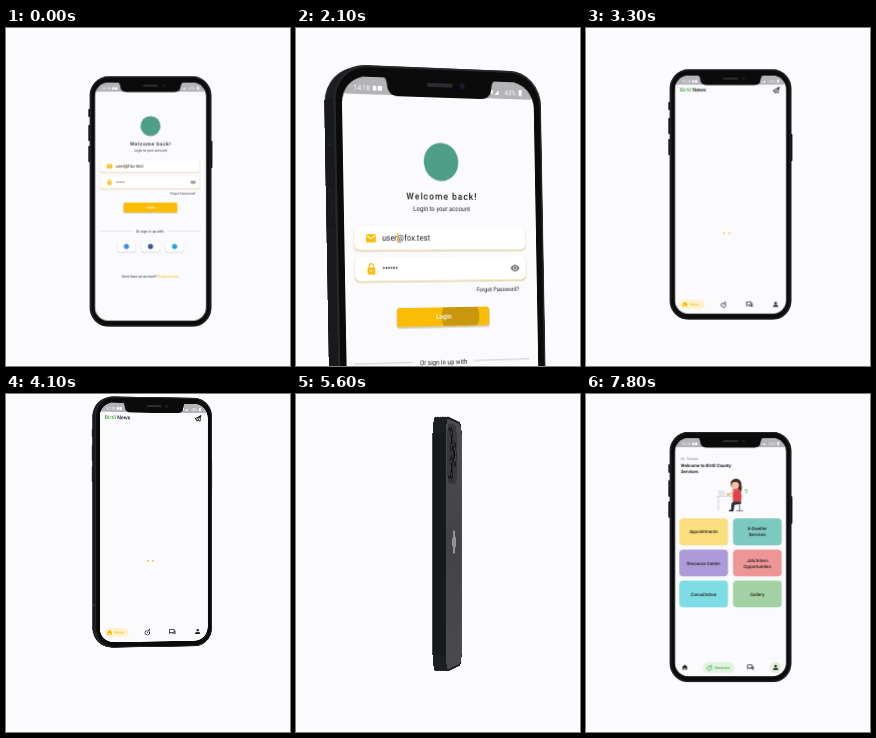
An HTML page that plays this animation: 284 by 338 pixels, repeating every 8000 ms.

```html
<!DOCTYPE html>
<html lang="en">
<head>
<meta charset="utf-8">
<title>Phone app showcase</title>
<style>
  html, body { margin: 0; width: 100%; height: 100%; overflow: hidden; background: #fcfbfe; }
  #stage { position: absolute; left: 0; top: 0; width: 284px; height: 338px; overflow: hidden; background: #fcfbfe; }
  #phone { position: absolute; left: -120px; top: -249px; width: 240px; height: 498px; transform-style: preserve-3d; }
  #phone > div { position: absolute; }
  .full { left: 0; top: 0; width: 240px; height: 498px; }
  .layer { border-radius: 37px; background: #1c1f21; }
  .layer i { position: absolute; width: 8px; background: #17191b; border-radius: 2px; }
  .side { width: 26px; height: 430px; top: 34px; backface-visibility: hidden; background: #17191a; }
  .side b { position: absolute; left: 11px; top: 378px; width: 4px; height: 4px; border-radius: 50%; background: #eee; }
  .side i { position: absolute; left: 8px; width: 8px; border: 1px solid #2b2d2f; border-radius: 4px; }
  .face { backface-visibility: hidden; }
  .back { box-sizing: border-box; border-radius: 37px; border: 4px solid #19191b;
          background: linear-gradient(#4c4c4f, #434346 50%, #4a4a4c); }
  .mark { position: absolute; left: 92px; top: 217px; width: 48px; height: 48px; border-radius: 50%; background: #929295; }
  .bump { position: absolute; left: 9px; top: 13px; width: 110px; height: 118px; border-radius: 29px; background: #38383b; }
  .bump u { position: absolute; box-sizing: border-box; width: 50px; height: 50px; border-radius: 50%;
            border: 6px solid #1a1a1c; background: radial-gradient(#0d0d10 35%, #55555a 40%, #242427 60%); }
  svg { position: absolute; left: 0; top: 0; font-family: Roboto, Inter, sans-serif; text-rendering: geometricPrecision; }
</style>
</head>
<body>
<div id="stage"><div id="phone"></div></div>
<script>
const LOOP = 8000, STEP = 100;
const GOLD = '#fbbc05', INK = '#222';

// time, centre x, centre y, scale, turn, roll
const POSES = [
  [0, 144.5, 173.5, 1, 0, 0],
  [450, 140.5, 198, 1.57, 2, -.1],
  [900, 137.3, 224, 2.05, 5, -.2],
  [1100, 138, 227, 2.055, 10, -.3],
  [1800, 139, 264, 2.03, 17, -.7],
  [2100, 142.3, 277.5, 1.895, 25, -1],
  [2700, 143, 212, 1.28, 14, -.5],
  [3100, 144.5, 171, 1.01, 1, 0],
  [3300, 144.5, 166.5, 1, 0, 0],
  [3600, 144.5, 134.5, 1, 0, 0],
  [4300, 148, 127.5, 1, 25, 0],
  [4800, 157, 127.5, 1, 100, 0],
  [5200, 159.2, 137, 1.02, 181, 0],
  [5600, 151.5, 150, 1, 262, 0],
  [6000, 145.5, 160.5, 1, 337, 0],
  [6300, 144.5, 163, 1, 360, 0]
];

// ---- drawing helpers -------------------------------------------------
const txt = (x, cy, size, str, more = '') =>
  `<text x="${x}" y="${cy + size * .35}" font-size="${size}" fill="${INK}" ${more}>${str}</text>`;
const mid = 'text-anchor="middle" ';
const box = (x, y, w, h, r, fill, more = '') =>
  `<rect x="${x}" y="${y}" width="${w}" height="${h}" rx="${r}" fill="${fill}" ${more}/>`;
const dot = (x, y, r, fill, more = '') => `<circle cx="${x}" cy="${y}" r="${r}" fill="${fill}" ${more}/>`;
const path = (d, fill, more = '') => `<path d="${d}" fill="${fill}" ${more}/>`;
const at = (x, y, body) => `<g transform="translate(${x} ${y})">${body}</g>`;
const raised = (x, y, w, h, r, tint) =>
  box(x - .6, y + .4, w + 1.2, h + 1.6, r, tint) + box(x, y, w, h, r, '#fff');

const home = c => path('M0-5.5L6 0H4.2V5H1.3V1.6H-1.3V5H-4.2V0H-6Z', c);
const person = c => dot(0, -2.6, 2.5, c) + path('M-5 5V3.5C-5 0 5 0 5 3.5V5Z', c);
const chat = c => path('M-6-5H3V1H-3.5L-6 3.2Z', 'none', `stroke="${c}" stroke-width="1.5"`) +
  path('M4.2-2.5H6V5.6L3.6 3.6H-2V2.2H4.2Z', c);
const leaf = c => path('M-2.5 4.5A3.6 3.6 0 0 1-2-2.4H1L4-5 3.4-1.4A4 4 0 0 1-2.5 4.5Z', 'none',
  `stroke="${c}" stroke-width="1.5"`) + dot(.6, .6, 1, c);
const plane = c => path('M-6.5 1L6-6 4 5.5-.2 3.4-2.6 6-2.8 2.4Z', 'none',
  `stroke="${c}" stroke-width="1.5" stroke-linejoin="round"`) + path('M-2.8 2.4L6-6-.2 3.4', 'none', `stroke="${c}" stroke-width="1.2"`);

// ---- screens ---------------------------------------------------------
function login() {
  const social = ['#4285f4', '#3b5998', '#1da1e8'].map((c, i) => {
    const x = 53 + i * 48;
    return raised(x, 327.5, 38, 22, 7, '#dcdce4') + dot(x + 19, 338.5, 5.2, c);
  }).join('');
  return dot(120, 98.5, 20, '#4f9f86') +
    txt(120.5, 135, 9.8, 'Welcome back!', mid + 'font-weight="500" letter-spacing="1.2"') +
    txt(120, 147.5, 6.85, 'Login to your account', mid) +
    raised(20, 166.5, 198, 24, 6, '#e8dcb8') + raised(20, 198.5, 198, 24, 6, '#e8dcb8') +
    at(38.5, 178.5, box(-5.5, -4.3, 11, 8.6, 1.2, GOLD) + path('M-4.6-2.8L0 .4 4.6-2.8', 'none', 'stroke="#fff" stroke-width="1.1"')) +
    at(38.5, 210.5, box(-4.3, -2, 8.6, 7.4, 1.1, GOLD) + dot(0, 1.7, 1.1, '#fff') +
      path('M-2.4-2V-3.4A2.4 2.4 0 0 1 2.4-3.4V-2', 'none', `stroke="${GOLD}" stroke-width="1.3"`)) +
    txt(51, 177.5, 8.8, 'user@fox.test') + box(68.2, 172.5, 1, 11, 0, GOLD) +
    txt(51, 209.5, 8, '••••••', 'font-weight="700"') +
    at(205, 210.5, path('M-5.5 0Q0-7.5 5.5 0Q0 7.5-5.5 0Z', '#777') + dot(0, 0, 2.3, '#fff') + dot(0, 0, 1.4, '#777')) +
    txt(209.5, 233, 6.3, 'Forgot Password?', 'text-anchor="end"') +
    box(65.8, 252, 108, 20.5, 3, '#d6cdb8') + box(66.5, 251, 106.5, 19.5, 2.5, GOLD) +
    `<g clip-path="url(#btn)">${dot(139.5, 260.5, 0, '#c9980f', 'id="ripple"')}</g>` +
    txt(120, 260.7, 7.2, 'Login', mid + 'style="fill:#fff" font-weight="500"') +
    box(18, 307.6, 66, .6, 0, '#aaa') + box(154, 307.6, 66, .6, 0, '#aaa') +
    txt(119, 308, 7.2, 'Or sign in up with', mid) + social +
    txt(119.5, 398, 7, `Dont have an account? <tspan fill="${GOLD}">Register here</tspan>`, mid);
}

function news() {
  return txt(19, 41, 10.8, '<tspan fill="#4caf50">Birtil</tspan> News', 'font-weight="500"') +
    at(211, 41, plane(INK)) +
    dot(0, 0, 2.1, '#f3cf3a', 'class="load"') + dot(0, 0, 2.1, '#d9d560', 'class="load"') +
    box(19, 459, 50, 18, 9, '#fff3cf') + at(29, 468, home(GOLD)) +
    txt(39, 468, 7, 'Home', `style="fill:${GOLD}" font-weight="500"`) +
    at(106, 468, leaf(INK)) + at(158, 468, chat(INK)) + at(210, 468, person(INK));
}

function desk() {
  return path('M92 128H130M96 128V156M126 128V156', 'none', 'stroke="#c9ced6" stroke-width="1.6"') +
    path('M98 127L95 116H107L110 127Z', '#dfe4ec') + box(113, 121, 4, 6, 1, '#e4b95c') +
    path('M148 116C152 112 154 118 151 122', 'none', 'stroke="#7fc48d" stroke-width="2"') +
    dot(131, 103, 10.5, '#4a2c23') + path('M139 100Q146 110 140 120L134 112Z', '#4a2c23') +
    dot(129.5, 106, 7.2, '#f4c3a0') + path('M121 103Q126 96 138 102L137 97Q128 92 121 98Z', '#4a2c23') +
    path('M124 114H138Q144 124 141 138H125Z', '#e2404a') +
    path('M126 118L116 126', 'none', 'stroke="#f4c3a0" stroke-width="3" stroke-linecap="round"') +
    path('M126 138H141V143L128 145 126 156H121L122 142Z', '#2c3042') +
    path('M138 143V157M132 157H145', 'none', 'stroke="#555b6b" stroke-width="1.6"') +
    box(117, 155, 9, 3, 1, '#222');
}

function services() {
  const cards = [
    ['#fbdf7e', 'Appointments'], ['#7cc9c0', 'E-Dweller', 'Services'],
    ['#ad9ad8', 'Resource Center'], ['#ee9696', 'Job/Intern', 'Opportunities'],
    ['#7edce4', 'Consultation'], ['#a2d2a4', 'Gallery']
  ].map(([c, ...lines], i) => {
    const x = i % 2 ? 125 : 18, y = 172 + (i >> 1) * 62;
    return box(x, y, 97, 53.5, 8, c) + lines.map((s, k) =>
      txt(x + 48.5, y + 27 + (k - (lines.length - 1) / 2) * 12, 9, s, mid + 'font-weight="500"')).join('');
  }).join('');
  return txt(21, 54, 8, 'Hi, Tolvee', 'style="fill:#888"') +
    txt(21, 67, 9, 'Welcome to Birtil County', 'font-weight="700"') +
    txt(21, 79, 9, 'Services', 'font-weight="700"') + desk() + cards +
    at(29, 469, home(INK)) + box(65, 458, 62, 22, 11, '#e2f3e2') + at(78, 469, leaf('#4caf50')) +
    txt(88, 469, 8, 'Services', 'style="fill:#4caf50" font-weight="500"') +
    at(160, 469, chat(INK)) + dot(210, 469, 0, '#dff0dc', 'id="tap"') + at(210, 469, person(INK));
}

function status() {
  const white = 'style="fill:#fff"';
  return box(9, 12, 222, 18, 0, '#b4b4b8') +
    txt(22, 23.5, 7.4, '14:18', white) + box(43.5, 21, 4, 5, 1, '#fff') +
    box(49, 21, 5, 5, 1, '#fff', 'id="note"') +
    path('M184 26L189 21V26Z', '#fff') + box(180, 21, 2, 4, 0, '#fff') +
    txt(196, 23.5, 7.4, '43%', white) + box(213, 20, 3.6, 6.5, .8, '#fff');
}

const front = `<svg width="240" height="498" viewBox="0 0 240 498">
  <clipPath id="scr"><rect x="9" y="12" width="222" height="475" rx="28"/></clipPath>
  <clipPath id="btn"><rect x="66.5" y="251" width="106.5" height="19.5" rx="2.5"/></clipPath>
  ${box(0, 0, 240, 498, 37, '#25282a')}${box(2, 2, 236, 494, 35, '#0b0b0c')}
  <g clip-path="url(#scr)">${box(9, 12, 222, 475, 0, '#fbfafd')}${status()}
  ${[login, news, services].map(f => `<g class="view">${f()}</g>`).join('')}</g>
  ${path('M54 11H186Q181 12 180.500 18Q180 31 168 31H72Q60 31 59.500 18Q59 12 54 11Z', '#0b0b0c')}
  ${box(105, 16, 30, 4, 2, '#2c2d30')}${dot(146, 18, 3, '#191b2b')}
</svg>`;

// ---- body ------------------------------------------------------------
const key = (left, top, h) => `<i style="left:${left}px;top:${top}px;height:${h}px"></i>`;
const LEFT_KEYS = [[64, 16], [96, 32], [138, 32]];
const keys = LEFT_KEYS.map(([y, h]) => key(-3, y, h)).join('') + key(235, 128, 54);
const seams = LEFT_KEYS.map(([y, h]) => key(8, y - 34, h)).join('');
let html = '';
for (let i = 0; i < 8; i++) {
  const z = -12 + i * 24 / 7;
  html += `<div class="full layer" style="transform:translateZ(${z}px)">${i > 1 && i < 6 ? keys : ''}</div>`;
}
html += `<div class="side" style="left:-13px;transform:rotateY(-90deg) translateZ(.3px)"><b></b>${seams}</div>` +
  '<div class="side" style="left:227px;transform:rotateY(90deg) translateZ(.3px)"></div>' +
  '<div class="full face back" style="transform:rotateY(180deg) translateZ(13.2px)"><span class="mark"></span></div>';
const lenses = [[6, 6], [6, 62], [55, 34]].map(([x, y]) => `<u style="left:${x}px;top:${y}px"></u>`).join('');
for (const z of [15, 17, 19])
  html += `<div class="full face" style="transform:rotateY(180deg) translateZ(${z}px)"><span class="bump">${lenses}</span></div>`;
html += `<div class="full face" style="transform:translateZ(13.2px)">${front}</div>`;

const phone = document.getElementById('phone');
phone.innerHTML = html;
const views = document.querySelectorAll('.view');
const loaders = document.querySelectorAll('.load');
const [ripple, tap, note] = ['ripple', 'tap', 'note'].map(id => document.getElementById(id));

// ---- motion ----------------------------------------------------------
const clamp = (v, a, b) => Math.min(b, Math.max(a, v));
const rise = (i, c) => POSES[i] && POSES[i + 1]
  ? (POSES[i + 1][c] - POSES[i][c]) / (POSES[i + 1][0] - POSES[i][0]) : 0;

// slope at a key, zero at turning points so nothing overshoots
function slope(i, c) {
  const a = rise(i - 1, c), b = rise(i, c);
  return a * b > 0 ? 2 * a * b / (a + b) : 0;
}

function pose(t) {
  const last = POSES.length - 1;
  if (t >= POSES[last][0]) return POSES[last].slice(1);
  let i = 0;
  while (POSES[i + 1][0] <= t) i++;
  const a = POSES[i], b = POSES[i + 1], d = b[0] - a[0], u = (t - a[0]) / d, v = 1 - u;
  return [1, 2, 3, 4, 5].map(c =>
    a[c] * v * v * (1 + 2 * u) + b[c] * u * u * (3 - 2 * u) +
    d * u * v * (v * slope(i, c) - u * slope(i + 1, c)));
}

function draw(t) {
  const [x, y, s, turn, roll] = pose(t), k = s / 2;
  phone.style.transform = `translate(${x}px,${y}px) perspective(1900px) rotateZ(${roll}deg) rotateY(${turn}deg) scale3d(${k},${k},${k})`;

  const shown = t < 2500 ? 0 : t < 5000 ? 1 : 2;
  views.forEach((v, i) => v.style.display = i === shown ? '' : 'none');

  ripple.setAttribute('r', clamp((t - 1900) / 200, 0, 4) * 22);
  tap.setAttribute('r', clamp((t - 7500) / 300, 0, 1) * 11);
  note.style.opacity = (t >= 6700 && t < 6800) || (t >= 7300 && t < 7600) ? 0 : 1;

  const a = (t - 3300) / 800 * Math.PI * 2;
  loaders.forEach((l, i) => {
    const r = i ? 5.5 : -5.5;
    l.setAttribute('cx', 112.5 + r * Math.cos(a));
    l.setAttribute('cy', 326 + r * Math.sin(a));
  });
}

const start = performance.now();
function tick() {
  const t = (performance.now() - start) % LOOP;
  draw(Math.floor(t / STEP) * STEP);
  requestAnimationFrame(tick);
}
tick();
</script>
</body>
</html>
```
